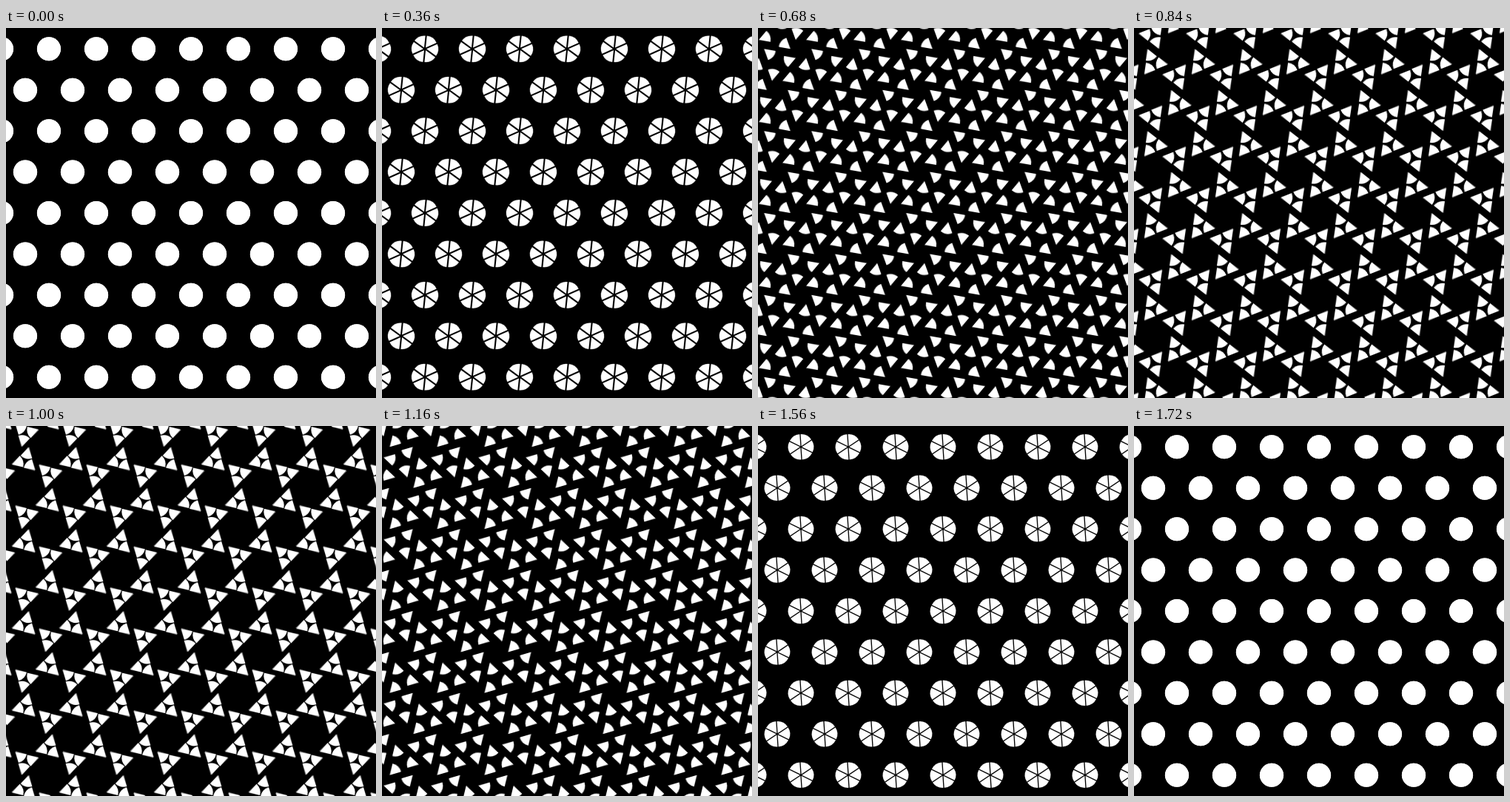
An HTML page without scripts that plays this animation: 500 by 500 pixels, repeating every 1920 ms.

```html
<!DOCTYPE html>
<html lang="en">
<head>
<meta charset="utf-8">
<title>Dots and wedges</title>
<style>
  @property --step { syntax: "<number>"; inherits: true; initial-value: -4; }
  @property --p { syntax: "<number>"; inherits: true; initial-value: 0; }
  @property --s { syntax: "<number>"; inherits: true; initial-value: 0; }

  html, body { margin: 0; height: 100%; overflow: hidden; background: #000; }
  svg {
    display: block; width: 100vw; height: 100vh; background: #000; fill: #fff;
    animation: tick 1920ms steps(48) infinite;
  }
  @keyframes tick { from { --step: -4; } to { --step: 44; } }

  /* Three moments of one exposure, added together as motion blur.
     --s is --p with a quadratic ease in and out. */
  .layer {
    --p: clamp(0, (var(--step) + var(--shift)) / 39, 1);
    --a: min(var(--p), .5);
    --b: max(var(--p) - .5, 0);
    --s: calc(2 * var(--a) * var(--a) + 2 * var(--b) * (1 - var(--b)));
    opacity: .3334;
    mix-blend-mode: plus-lighter;
  }

  /* Each wedge slides to the neighbouring dot while making a half turn. */
  .wedge { transform: translateX(calc(64px * var(--s))) rotate(calc(180deg * var(--s))); }

  /* Whole dots hide the seams while everything rests. */
  .whole { opacity: clamp(0, max(1 - var(--step), var(--step) - 38), 1); }
</style>
</head>
<body>
<svg viewBox="0 0 500 500">
  <defs>
    <path id="wedge" class="wedge" d="M0 0L13.856-8A16 16 0 0 1 13.856 8Z"/>
    <g id="pair">
      <use href="#wedge"/>
      <use href="#wedge" transform="rotate(180)"/>
    </g>
    <g id="dot">
      <use href="#pair"/>
      <use href="#pair" transform="rotate(60)"/>
      <use href="#pair" transform="rotate(120)"/>
      <circle class="whole" r="16"/>
    </g>
    <g id="row">
      <use href="#dot" x="-320"/>
      <use href="#dot" x="-256"/>
      <use href="#dot" x="-192"/>
      <use href="#dot" x="-128"/>
      <use href="#dot" x="-64"/>
      <use href="#dot"/>
      <use href="#dot" x="64"/>
      <use href="#dot" x="128"/>
      <use href="#dot" x="192"/>
      <use href="#dot" x="256"/>
      <use href="#dot" x="320"/>
    </g>
    <g id="rows">
      <use href="#row"/>
      <use href="#row" x="32" y="55.426"/>
    </g>
    <g id="field" transform="translate(250 250)">
      <use href="#row" x="32" y="-277.128"/>
      <use href="#rows" y="-221.703"/>
      <use href="#rows" y="-110.851"/>
      <use href="#rows"/>
      <use href="#rows" y="110.851"/>
      <use href="#rows" y="221.703"/>
    </g>
  </defs>
  <g class="layer" style="--shift: -.3"><use href="#field"/></g>
  <g class="layer" style="--shift: 0"><use href="#field"/></g>
  <g class="layer" style="--shift: .3"><use href="#field"/></g>
</svg>
</body>
</html>
```
